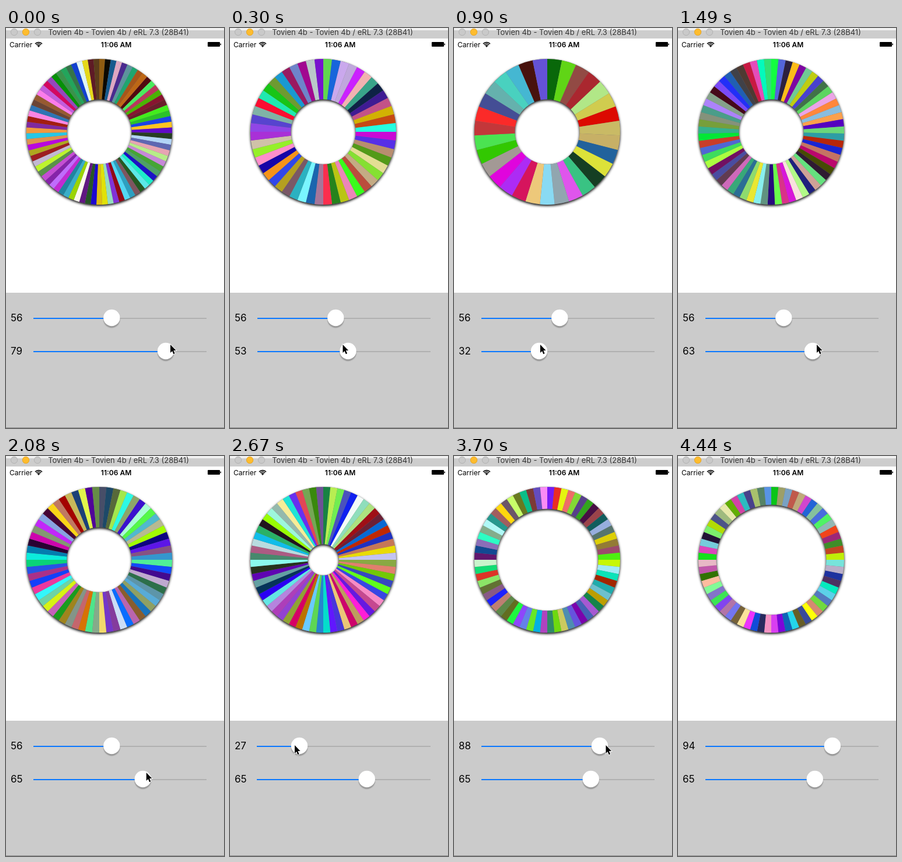
An HTML page with a canvas that plays this animation: 374 by 686 pixels, repeating every 4.86 s.

```html
<!DOCTYPE html>
<html lang="en">
<head>
<meta charset="utf-8">
<title>Ring sliders</title>
<style>
  html, body { margin: 0; overflow: hidden; background: #fff; }
  canvas { display: block; }
</style>
</head>
<body>
<canvas id="stage" width="374" height="686"></canvas>
<script>
const ctx = document.getElementById('stage').getContext('2d');
const LOOP = 4860, STEP = 148, LAST_STEP = 30, RELEASE = 28;
const TAU = Math.PI * 2;
const FONT = 'Inter, "Open Sans", sans-serif';

// Slider drags: [step, value, pointer offset from the thumb]
const COUNT = { y: 554, scale: 2.69, drag: [[0, 79.2, 8], [2, 52.6, -9], [6, 31.6, 2], [10, 63.2, 7], [14, 64.6, 6]] };
const HOLE = { y: 497, scale: 2.16, drag: [[15, 55.7, -8], [18, 26.85, -8], [22, 80.6, 12], [RELEASE, 94.4, 9]] };

const clamp = (v, lo, hi) => Math.max(lo, Math.min(hi, v));
const mix = (a, b, p) => a + (b - a) * p;

function sliderAt({ y, scale, drag }, step) {
  step = clamp(step, drag[0][0], drag[drag.length - 1][0]);
  const next = Math.max(1, drag.findIndex(key => key[0] >= step));
  const a = drag[next - 1], b = drag[next];
  const p = (step - a[0]) / (b[0] - a[0]);
  const value = mix(a[1], b[1], p);
  const thumb = 61 + value * scale;
  return { y, value, thumb, pointer: thumb + mix(a[2], b[2], p) };
}

function randomFrom(seed) {
  return () => {
    seed = (seed + 0x6D2B79F5) | 0;
    let n = Math.imul(seed ^ (seed >>> 15), 1 | seed);
    n = (n + Math.imul(n ^ (n >>> 7), 61 | n)) ^ n;
    return ((n ^ (n >>> 14)) >>> 0) / 4294967296;
  };
}

function rect(x, y, w, h, color) {
  ctx.fillStyle = color;
  ctx.fillRect(x, y, w, h);
}

function disc(x, y, r, color) {
  ctx.fillStyle = color;
  ctx.beginPath();
  ctx.arc(x, y, r, 0, TAU);
  ctx.fill();
}

function arc(x, y, r, from, to, width, color) {
  ctx.strokeStyle = color;
  ctx.lineWidth = width;
  ctx.beginPath();
  ctx.arc(x, y, r, from, to);
  ctx.stroke();
}

function text(str, x, y, font, color = '#000', align = 'left') {
  ctx.font = `${font} ${FONT}`;
  ctx.fillStyle = color;
  ctx.textAlign = align;
  ctx.fillText(str, x, y);
}

function withShadow(color, blur, offset, paint) {
  ctx.save();
  ctx.shadowColor = color;
  ctx.shadowBlur = blur;
  ctx.shadowOffsetY = offset;
  paint();
  ctx.restore();
}

function drawWindow() {
  rect(0, 0, 374, 686, '#fff');
  rect(0, 4, 374, 14, '#cdcdcd');
  rect(0, 0, 374, 4, '#f0f0f0');
  for (const x of [14, 34, 54]) {
    disc(x, 7, 6, x === 34 ? '#fdbc2e' : '#c9c9c9');
    arc(x, 7, 5.7, 0, TAU, 0.8, x === 34 ? '#e0a028' : '#adadad');
  }
  text('Tovien 4b - Tovien 4b / eRL 7.3 (28B41)', 193, 12, '13px', '#333', 'center');

  text('Carrier', 6, 32.5, '12px');
  for (const r of [3.2, 5.8, 8.4]) arc(56, 33, r, -TAU * 3 / 8, -TAU / 8, 1.6, '#000');
  disc(56, 31.6, 1.2, '#000');
  text('11:06 AM', 189, 32.5, '600 12px', '#000', 'center');
  ctx.beginPath();
  ctx.roundRect(346, 24, 21, 8, 1);
  ctx.roundRect(367.5, 26.5, 1.5, 3, 0.7);
  ctx.fill();

  rect(0, 454, 374, 232, '#cbcbcb');
  rect(0, 685, 374, 1, '#8c8c8c');
}

function drawRing(count, hole, seed) {
  const random = randomFrom(seed * 7919 + 13);
  const channel = () => Math.floor(random() * 256);
  const radius = (125 + hole) / 2, width = 125 - hole;
  withShadow('#000', 4, 2, () => arc(160, 178, radius, 0, TAU, width, '#777'));
  for (let i = 0; i < count; i++) {
    const from = TAU * i / count - TAU / 4;
    arc(160, 178, radius, from, from + TAU / count, width,
      `rgb(${channel()}, ${channel()}, ${channel()})`);
  }
}

function drawSlider({ y, value, thumb }, left) {
  text(Math.round(value), 8, y + 6, '17px');
  rect(left, y, 344 - left, 2, '#b0b0b0');
  rect(left, y, thumb - left, 2, '#0a78ff');
  withShadow('rgba(0, 0, 0, 0.25)', 1.5, 3, () => disc(thumb, y, 14.2, '#fff'));
}

function drawPointer(x, y) {
  const arrow = new Path2D('M0 0V15.5L3.6 12.2L6.1 18L8.7 16.9L6.2 11.2H11Z');
  ctx.save();
  ctx.translate(x, y);
  ctx.scale(0.87, 0.9);
  ctx.lineWidth = 1.8;
  ctx.strokeStyle = '#fff';
  ctx.stroke(arrow);
  ctx.fillStyle = '#000';
  ctx.fill(arrow);
  ctx.restore();
}

function draw(time) {
  const step = Math.min(LAST_STEP, Math.floor(time / STEP));
  const count = sliderAt(COUNT, step), hole = sliderAt(HOLE, step);
  drawWindow();
  drawRing(Math.floor(count.value), hole.value, Math.min(step, RELEASE));

  ctx.font = `17px ${FONT}`;
  const left = Math.min(47, Math.round(26 + ctx.measureText(Math.round(hole.value)).width));
  drawSlider(hole, left);
  drawSlider(count, left);

  // The pointer moves up to the other slider, then leaves through the bottom edge.
  const change = clamp((step - 14) / 2, 0, 1), exit = Math.max(0, step - RELEASE);
  drawPointer(mix(count.pointer, hole.pointer, change) + 26 * exit,
    mix(543, 496, change) + 102 * exit);
}

function frame() {
  draw(performance.now() % LOOP);
  requestAnimationFrame(frame);
}
frame();
</script>
</body>
</html>
```
